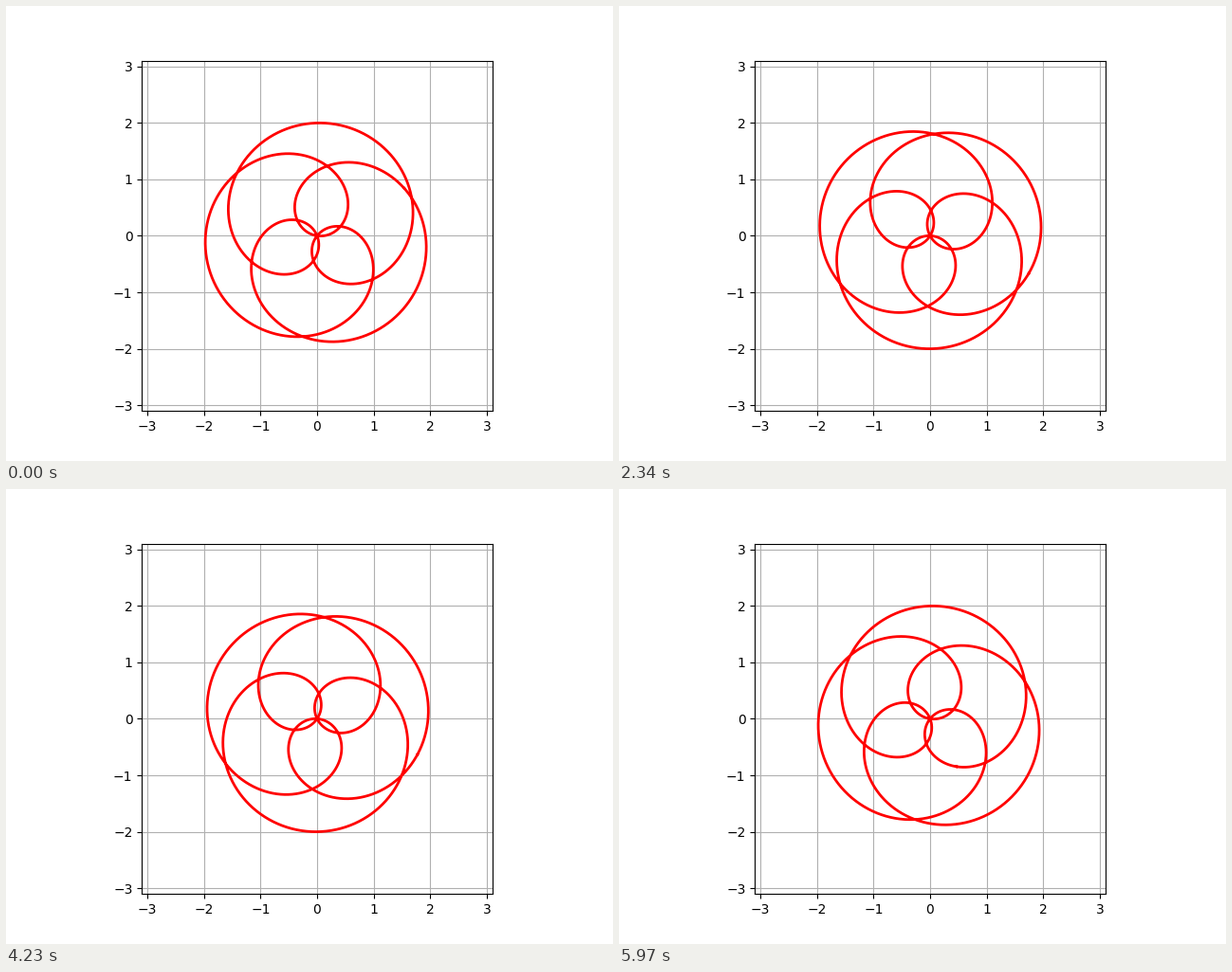
These frames come from a looping animation (640x480 px, 6 s). A matplotlib script:

```python
import numpy as np
import matplotlib.pyplot as plt
from matplotlib.animation import FuncAnimation

FRAMES = 200
INTERVAL = 30  # ms
LIMIT = 3.1

t = np.linspace(0, 2 * np.pi, 1000)


def curve(phase):
    """Sum of two unit circular motions, the faster one shifted by phase."""
    x = np.cos(2 * t) + np.cos(5 * t + phase)
    y = np.sin(2 * t) + np.sin(5 * t + phase)
    return x, y


fig, ax = plt.subplots(figsize=(6.4, 4.8), dpi=100)
ax.set_aspect("equal")
ax.set_xlim(-LIMIT, LIMIT)
ax.set_ylim(-LIMIT, LIMIT)
ax.grid()
line, = ax.plot([], [], color="red", lw=2)


def update(i):
    line.set_data(*curve(1 + 0.3 * i))
    return line,


anim = FuncAnimation(fig, update, frames=FRAMES, interval=INTERVAL,
                     repeat=True, repeat_delay=0)
plt.show()
```
